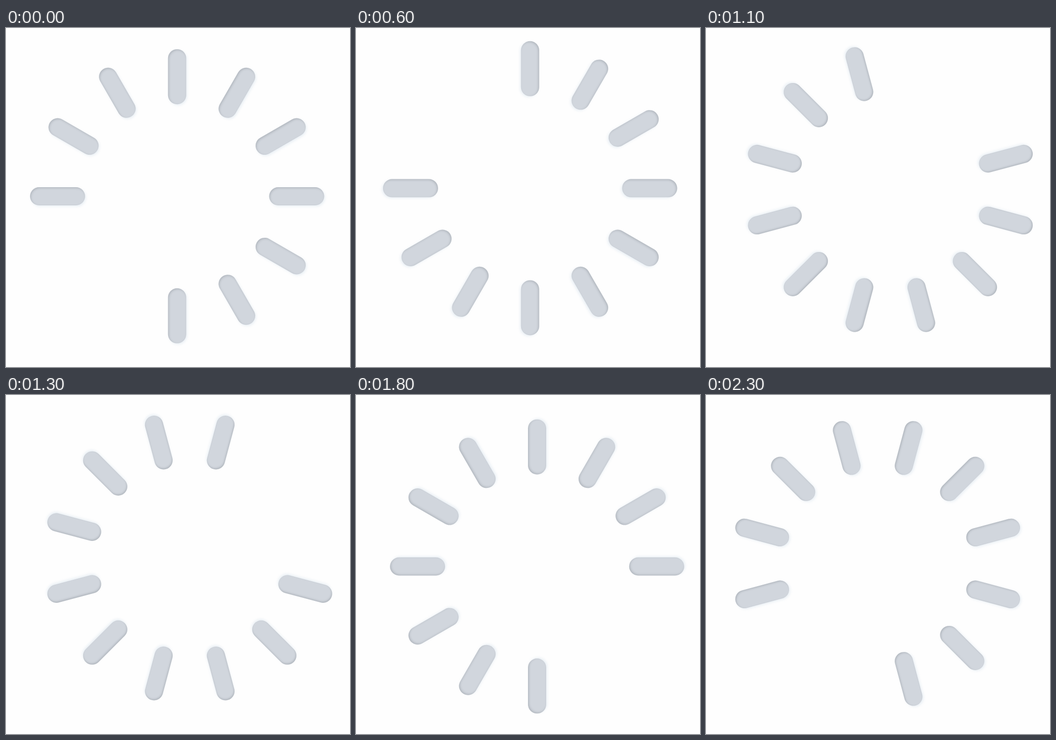
Animation, 700 px wide and 690 px high, one loop 2400 ms. Source, as an HTML page:

```html
<!DOCTYPE html>
<html lang="en">
<head>
<meta charset="utf-8">
<title>Spinner</title>
<style>
  html, body { margin: 0; width: 100%; height: 100%; overflow: hidden; background: #fefefe; }
  #stage { position: fixed; inset: 0; overflow: hidden; contain: strict; }
  #wheel { position: absolute; left: 0; top: 0; width: 0; height: 0; }
  .bar {
    position: absolute; left: 187.3px; top: -18.5px;
    width: 111.5px; height: 37px; border-radius: 18.5px;
    background: #d1d6dd;
    transform-origin: -187.3px 18.5px;
  }
</style>
</head>
<body>
<div id="stage"><div id="wheel"></div></div>
<script>
  const STEP_MS = 100, STEPS = 24, BARS = 10;
  const wheel = document.getElementById('wheel');

  // Key points of the hub's drift: step, x, y
  const drift = [
    [0, 348.5, 342], [4, 353.5, 327.8], [8, 356, 325], [11, 375, 329.5],
    [15, 372, 334.8], [18, 368, 348.7], [23, 349.5, 342.3], [STEPS, 348.5, 342]
  ];

  // The light is fixed to the wheel, so each bar turns its shadow back.
  for (let i = 0; i < BARS; i++) {
    const bar = document.createElement('div');
    const angle = 180 + i * 30;
    const light = (50 - angle) * Math.PI / 180;
    const offset = d => `${d * Math.cos(light)}px ${d * Math.sin(light)}px`;
    bar.className = 'bar';
    bar.style.transform = `rotate(${angle}deg)`;
    bar.style.boxShadow =
      `inset ${offset(2.4)} 4px rgba(85, 92, 102, .26), ` +
      `${offset(3)} 5px rgba(190, 207, 225, .3)`;
    wheel.append(bar);
  }

  function hub(step) {
    const k = drift.findIndex(p => p[0] > step);
    const [s0, x0, y0] = drift[k - 1], [s1, x1, y1] = drift[k];
    const f = (step - s0) / (s1 - s0);
    return [x0 + (x1 - x0) * f, y0 + (y1 - y0) * f];
  }

  function draw() {
    const step = Math.floor(performance.now() / STEP_MS) % STEPS;
    const [x, y] = hub(step);
    wheel.style.transform = `translate(${x}px, ${y}px) rotate(${step * 360 / STEPS}deg)`;
    requestAnimationFrame(draw);
  }
  draw();
</script>
</body>
</html>
```
